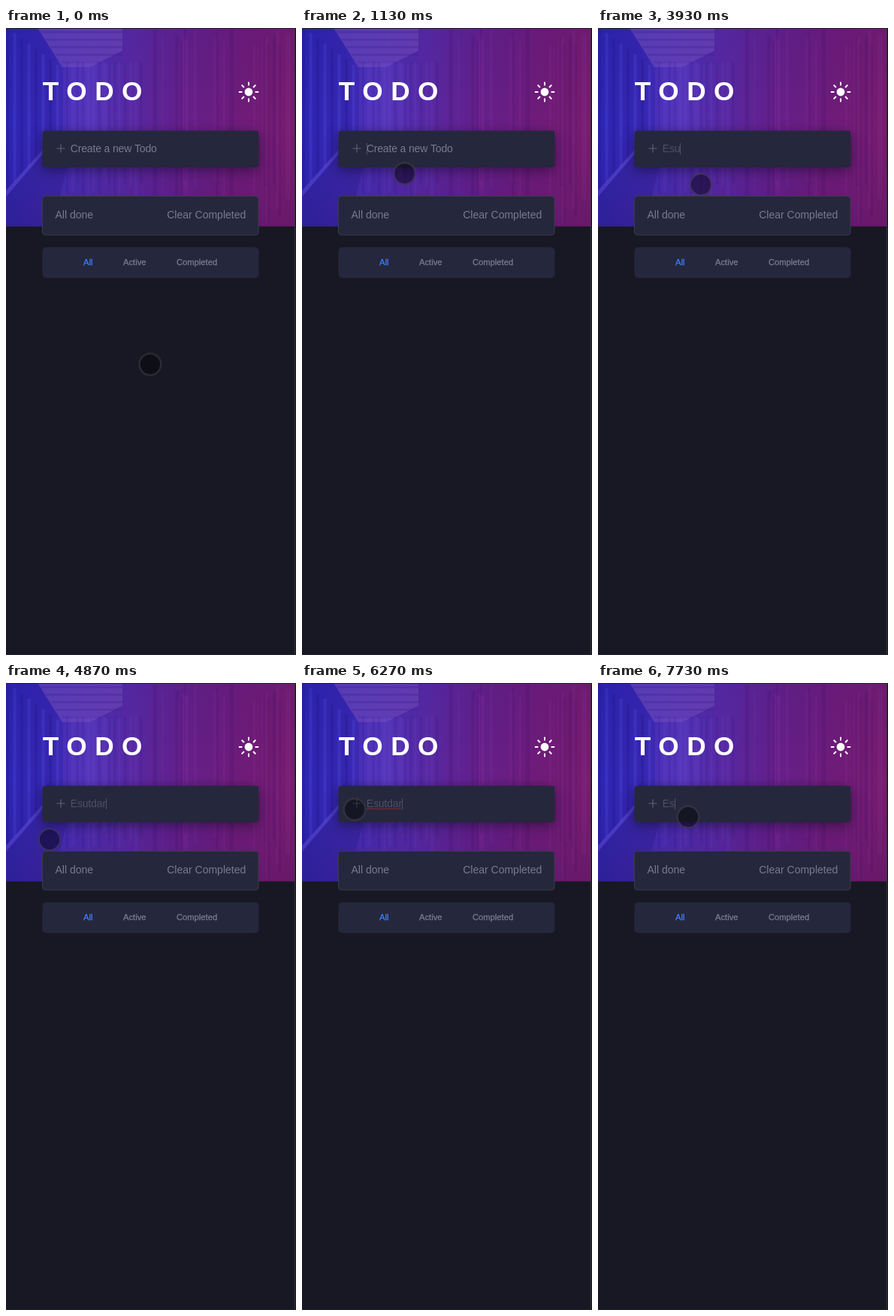
An HTML page with a canvas for the animation above (8 s loop, 386 by 833 pixels).

```html
<!DOCTYPE html>
<html lang="en">
<head>
<meta charset="utf-8">
<title>Todo</title>
<style>
  html, body { margin: 0; width: 100%; height: 100%; overflow: hidden; background: #171823; }
  canvas { display: block; width: 386px; height: 833px; }
</style>
</head>
<body>
<canvas id="stage"></canvas>
<script>
const W = 386, H = 833, LOOP = 8000, TICK = 200 / 3;
const SANS = '"Liberation Sans", Arial, sans-serif';
const BODY = '14px ' + SANS, SMALL = '11.2px ' + SANS;
const INK = '#777a92', DIM = '#4d5066', CARD = '#25273c';
const TEXT_X = 85.7, BASE_Y = 165, BLINK = 500;
const dpr = window.devicePixelRatio || 1;
const view = document.getElementById('stage');

// pointer strokes: start, end, control point, end point
const HOME = [192, 447];
const STROKES = [
  { from: 0, to: 200, via: [170, 410], end: [150, 376] },
  { from: 333, to: 733, via: [102, 255], end: [145, 163] },
  { from: 1000, to: 1200, via: [134, 186], end: [137, 208] },
  { from: 4733, to: 4867, via: [98, 208], end: [58, 208] },
  { from: 4867, to: 5600, via: [23, 258], end: [64, 178] },
  { from: 5600, to: 6067, via: [59, 168], end: [70, 168] },
  { from: 6267, to: 6733, via: [118, 166], end: [120, 178] }
];

// words and the moment of each key press; "end" clears the word
const FOCUS = 933, CHECKED = 6000, CLICK = 6867, SELECT = 6933;
const WORDS = [
  { word: 'R', keys: [2267], end: 3000 },
  { word: 'Esutdar', keys: [3267, 3733, 3933, 4000, 4333, 4533, 4800], end: 7333 },
  { word: 'Es', keys: [7333, 7733], end: LOOP }
];
const RESETS = [FOCUS, CLICK, ...WORDS.flatMap(w => w.keys)].sort((a, b) => a - b);

function layer(canvas) {
  canvas.width = W * dpr;
  canvas.height = H * dpr;
  const g = canvas.getContext('2d');
  g.scale(dpr, dpr);
  return g;
}

function label(g, text, x, y, font, color, spacing = 0) {
  g.font = font;
  g.letterSpacing = spacing + 'px';
  g.fillStyle = color;
  g.fillText(text, x, y);
}

function tab(g, text, x, color) {
  label(g, text, x, 315, SMALL, color);
  g.strokeStyle = color;
  g.lineWidth = 0.3;
  g.strokeText(text, x, 315);
}

function panel(g, x, y, w, h, r) {
  g.beginPath();
  g.roundRect(x, y, w, h, r);
  g.fillStyle = CARD;
  g.fill();
}

function poly(g, color, ...pts) {
  g.beginPath();
  for (let i = 0; i < pts.length; i += 2) g.lineTo(pts[i], pts[i + 1]);
  g.fillStyle = color;
  g.fill();
}

function gradient(g, x0, y0, x1, y1, ...colors) {
  const fill = g.createLinearGradient(x0, y0, x1, y1);
  colors.forEach((c, i) => fill.addColorStop(i / (colors.length - 1), c));
  return fill;
}

function randomizer(seed) {
  return () => (seed = (seed * 16807) % 2147483647) / 2147483647;
}

function drawHero(g) {
  const rnd = randomizer(71);
  g.save();
  g.beginPath();
  g.rect(0, 0, W, 263.5);
  g.clip();
  g.fillStyle = gradient(g, 0, 110, W, 150, '#322bb8', '#462db6', '#572aa6', '#64208c', '#6f1c7a', '#781c6e');
  g.fillRect(0, 0, W, 264);

  // ceiling and its beams
  poly(g, 'rgba(124,84,196,.5)', 42, 0, 155, 0, 155, 30, 112, 52, 74, 52);
  for (let i = 0; i < 5; i++) {
    const y = 4 + i * 10, left = 45 + i * 7;
    poly(g, 'rgba(60,34,160,.3)', left, y, 155, y, 155, y + 3, left + 2, y + 3);
  }
  // left wall with slanted shelves
  poly(g, 'rgba(30,26,168,.3)', 0, 0, 42, 0, 76, 52, 76, 138, 0, 225);
  for (let i = 0; i < 8; i++) {
    const x = i * 9.5, top = i * 7;
    g.fillStyle = i % 2 ? 'rgba(88,84,226,.25)' : 'rgba(26,20,120,.22)';
    g.fillRect(x, top, 4, 215 - i * 17);
  }
  // floor and the bright rail above it
  poly(g, 'rgba(38,22,130,.32)', 0, 264, 0, 225, 76, 138, 92, 138, 62, 264);
  poly(g, 'rgba(110,92,226,.45)', 0, 216, 70, 138, 74, 138, 0, 224);
  // glow at the far end
  g.fillStyle = gradient(g, 60, 0, 160, 0, 'rgba(110,80,220,0)', 'rgba(110,80,220,.3)', 'rgba(110,80,220,0)');
  g.fillRect(60, 44, 100, 95);
  // far columns
  for (let x = 80; x < 185; x += 7) {
    g.fillStyle = rnd() > 0.5 ? 'rgba(118,84,214,.12)' : 'rgba(40,20,120,.14)';
    g.fillRect(x, 45, 2 + rnd() * 3, 150 + rnd() * 40);
  }
  // right wall
  for (let i = 0; i < 26; i++) {
    g.fillStyle = rnd() > 0.5 ? 'rgba(158,62,160,.12)' : 'rgba(66,12,92,.16)';
    g.fillRect(182 + rnd() * 196, rnd() * 25, 1 + rnd() * 5, 190 + rnd() * 74);
  }
  g.fillStyle = gradient(g, 0, 0, 0, 264, 'rgba(40,10,90,.1)', 'rgba(40,10,90,0)', 'rgba(30,8,80,.16)');
  g.fillRect(0, 0, W, 264);
  g.restore();
}

function drawSun(g, x, y) {
  g.fillStyle = g.strokeStyle = '#fff';
  g.lineWidth = 2;
  g.beginPath();
  g.arc(x, y, 5.4, 0, 7);
  g.fill();
  for (let i = 0; i < 8; i++) {
    const c = Math.cos(i * Math.PI / 4), s = Math.sin(i * Math.PI / 4);
    g.beginPath();
    g.moveTo(x + c * 8.6, y + s * 8.6);
    g.lineTo(x + c * 13.2, y + s * 13.2);
    g.stroke();
  }
}

function drawPage(g) {
  g.fillStyle = '#171823';
  g.fillRect(0, 0, W, H);
  drawHero(g);

  label(g, 'TODO', 48.8, 96.3, 'bold 35.2px ' + SANS, '#fff', 10.56);
  drawSun(g, 323, 85);

  g.shadowColor = 'rgba(10,8,30,.5)';
  g.shadowBlur = 16 * dpr;
  g.shadowOffsetY = 4 * dpr;
  panel(g, 48.5, 136.5, 288, 48.5, 4);
  g.shadowColor = 'transparent';

  g.strokeStyle = '#606276';
  g.lineWidth = 1.2;
  g.beginPath();
  g.moveTo(67.5, 160); g.lineTo(78.5, 160);
  g.moveTo(73, 154.5); g.lineTo(73, 165.5);
  g.stroke();

  panel(g, 48.5, 223.5, 287.5, 51.5, 4);
  g.strokeStyle = '#393a4b';
  g.lineWidth = 1;
  g.stroke();
  label(g, 'All done', 65.5, 253, BODY, INK);
  label(g, 'Clear Completed', 214.2, 253, BODY, INK);

  panel(g, 48.5, 291.3, 288, 41, 5);
  tab(g, 'All', 103, '#3a7cfd');
  tab(g, 'Active', 156, INK);
  tab(g, 'Completed', 227, INK);

  // window edges
  g.fillStyle = '#24242a';
  g.fillRect(0, 0, W, 1);
  g.fillRect(0, H - 1, W, 1);
  g.fillStyle = '#36363c';
  g.fillRect(384, 0, 1, H);
  g.fillStyle = '#101016';
  g.fillRect(385, 0, 1, H);
}

function pointerAt(t) {
  let pos = HOME;
  for (const { from, to, via, end } of STROKES) {
    if (t < from) break;
    const k = Math.min(1, (t - from) / (to - from)), r = 1 - k;
    pos = pos.map((p, i) => r * r * p + 2 * r * k * via[i] + k * k * end[i]);
  }
  return pos;
}

function textAt(t) {
  const entry = WORDS.find(w => t >= w.keys[0] && t < w.end);
  return entry ? entry.word.slice(0, entry.keys.filter(k => k <= t).length) : '';
}

function caretAt(t) {
  const last = RESETS.findLast(r => r <= t);
  return last !== undefined && Math.floor((t - last) / BLINK) % 2 === 0;
}

function drawSquiggle(g, width) {
  g.strokeStyle = '#a02c36';
  g.lineWidth = 1;
  g.beginPath();
  for (let x = 0; x <= width; x += 2) g.lineTo(TEXT_X + x, x % 4 ? 168 : 166.4);
  g.stroke();
}

function drawInput(g, t) {
  const text = textAt(t);
  const selected = t >= SELECT && t < WORDS[1].end;
  g.font = BODY;
  g.letterSpacing = '-0.15px';
  const width = g.measureText(text).width;
  if (selected) {
    g.fillStyle = '#0078d7';
    g.fillRect(85.5, 152, width + 0.8, 17);
  }
  const color = selected ? '#fff' : text ? DIM : INK;
  label(g, text || 'Create a new Todo', TEXT_X, BASE_Y, BODY, color, -0.15);
  if (t >= CHECKED && t < WORDS[1].end) drawSquiggle(g, width);
  if (caretAt(t) && !selected) {
    g.fillStyle = DIM;
    g.fillRect(Math.round(TEXT_X + width), 153, 1, 15);
  }
}

function drawPointer(g, x, y) {
  g.beginPath();
  g.arc(x, y, 13.2, 0, 7);
  g.fillStyle = 'rgba(4,4,8,.48)';
  g.fill();
  g.beginPath();
  g.arc(x, y, 14.4, 0, 7);
  g.strokeStyle = 'rgba(60,58,68,.55)';
  g.lineWidth = 2.5;
  g.stroke();
}

const page = document.createElement('canvas');
drawPage(layer(page));
const ctx = layer(view);

function render(now) {
  const t = Math.floor((now % LOOP + 4) / TICK) * TICK + 0.5;
  ctx.drawImage(page, 0, 0, W, H);
  drawInput(ctx, t);
  drawPointer(ctx, ...pointerAt(t));
}

let start;
function loop(now) {
  start ??= now;
  render(now - start);
  requestAnimationFrame(loop);
}
render(0);
requestAnimationFrame(loop);
</script>
</body>
</html>
```
